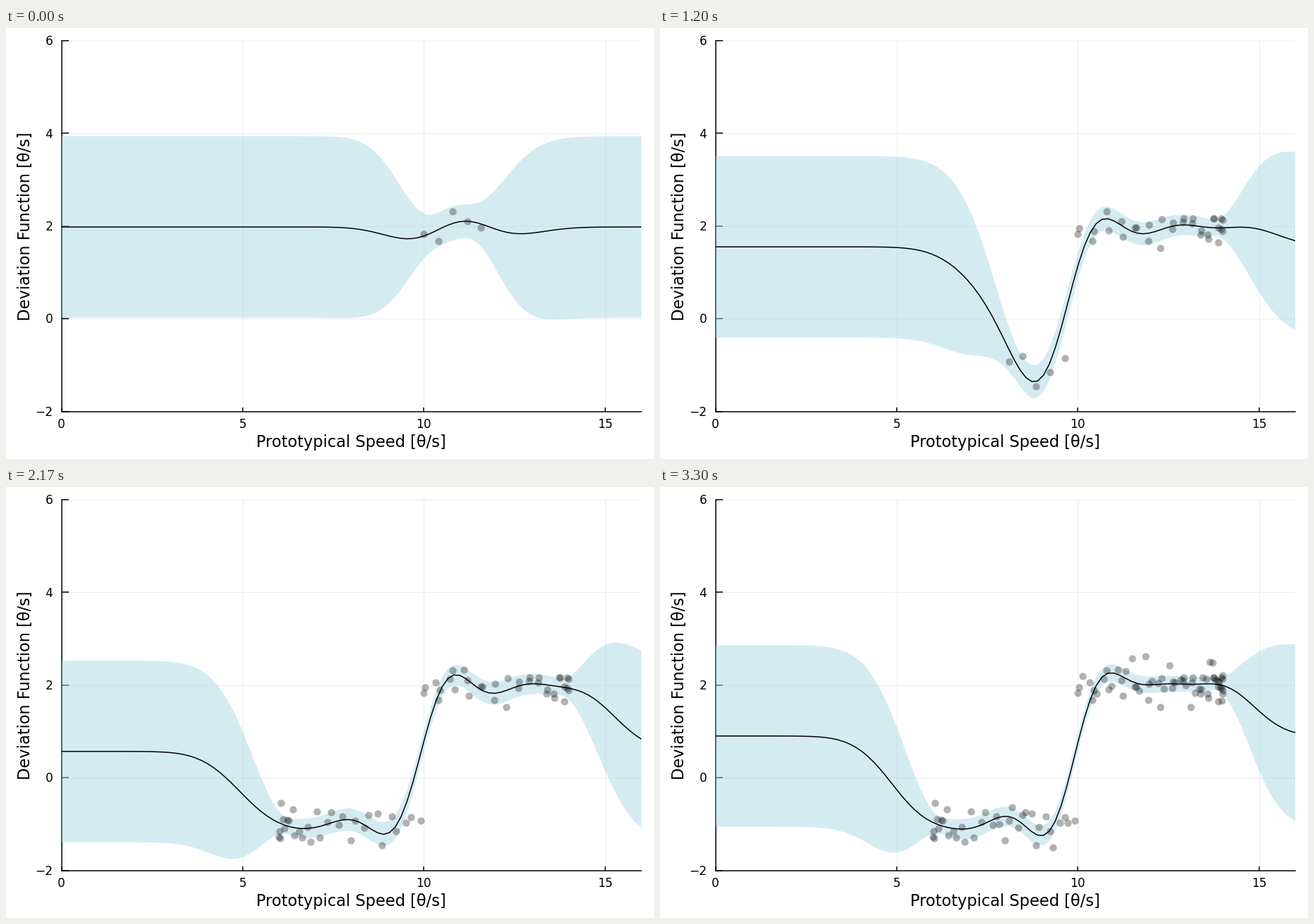
Write a matplotlib script that moves like this. It is 917 px wide and 611 px high and loops after 3330 ms.

```python
import numpy as np
import matplotlib.pyplot as plt
from matplotlib.animation import FuncAnimation
from matplotlib.patches import Polygon

W, H, DPI = 917, 611, 64
PX = 72 / DPI                               # points per pixel
LEFT, RIGHT, TOP, BOTTOM = 78.5, 899, 18, 543.5
N, START, LOOP = 100, 5, 3330
NOISE, Z = 0.3, 1.96

plt.rcParams["font.family"] = "DejaVu Sans"

# Noisy samples of a step function, visited along a sine sweep
speed = 10 + 4 * np.sin(np.linspace(0, 10, N))
dev = np.array([
    183, 168, 231, 211, 197, 167, 152, 194, 209, 205,
    181, 182, 217, 197, 194, 189, 213, 216, 165, 217,
    172, 191, 217, 217, 207, 215, 202, 197, 177, 191,
    189, 195, -85, -115, -146, -80, -93, -83, -75, -129,
    -138, -129, -124, -93, -109, -55, -115, -128, -131, -90,
    -91, -69, -115, -106, -73, -96, -102, -135, -108, -77,
    -84, -98, -93, 206, 213, 233, 257, 262, 204, 243,
    212, 152, 192, 213, 248, 209, 196, 181, 221, 166,
    207, 212, 250, 217, 183, 200, 206, 192, 209, 188,
    230, 198, 181, 220, -97, -150, -107, -74, -63, -101]) / 100
grid = np.linspace(0, 16, 100)


def kernel(a, b):
    return np.exp(-0.5 * (a[:, None] - b[None, :]) ** 2)


def posterior(n):
    """Gaussian process mean and 95 % half-width from the first n samples."""
    x, y = speed[:n], dev[:n]
    cov = kernel(x, x) + NOISE ** 2 * np.eye(n)
    cross = kernel(x, grid)
    weights = np.linalg.solve(cov, cross)
    mean = y.mean() + weights.T @ (y - y.mean())
    var = 1 - np.sum(cross * weights, axis=0)
    return mean, Z * np.sqrt(np.maximum(var, 0))


fig = plt.figure(figsize=(W / DPI, H / DPI), dpi=DPI, facecolor="white")
ax = fig.add_axes([LEFT / W, 1 - BOTTOM / H, (RIGHT - LEFT) / W, (BOTTOM - TOP) / H])
ax.set(xlim=(0, 16), ylim=(-2, 6), xticks=range(0, 16, 5), yticks=range(-2, 7, 2))
ax.set_axisbelow(True)
ax.grid(color="black", alpha=0.08, linewidth=1 * PX)
for axis, length in (("x", 6), ("y", 10)):
    ax.tick_params(axis=axis, direction="in", length=length * PX, width=1.5 * PX,
                   labelbottom=False, labelleft=False)
for side, spine in ax.spines.items():
    spine.set(visible=side in ("left", "bottom"), linewidth=1.5 * PX, zorder=0.6)


def label(x, y, text, size, **kw):
    fig.text(x / W, 1 - y / H, text, fontsize=size * PX, va="baseline", **kw)


for v in range(0, 16, 5):
    label(LEFT + v * (RIGHT - LEFT) / 16, 567, str(v), 17, ha="center")
for v in range(-2, 7, 2):
    y = BOTTOM - (v + 2) * (BOTTOM - TOP) / 8
    label(66.5, y + 6.3, str(v).replace("-", "\u2212"), 17, ha="right")
label(488.7, 594, "Prototypical Speed [θ/s]", 22.5, ha="center")
fig.text(34 / W, 1 - 281 / H, "Deviation Function [θ/s]", fontsize=22.5 * PX,
         rotation=90, rotation_mode="anchor", ha="center", va="baseline")

band = ax.add_patch(Polygon(np.zeros((3, 2)), facecolor="lightblue", alpha=0.5,
                            linewidth=0, zorder=1))
line, = ax.plot([], [], color="black", linewidth=1.5 * PX, zorder=2)
dots = ax.scatter([], [], s=(10.3 * PX) ** 2, color="black", alpha=0.3,
                  linewidths=0, zorder=3)


def draw(i):
    n = max(START, i + 1)
    mean, half = posterior(n)
    band.set_xy(np.column_stack([np.r_[grid, grid[::-1]],
                                 np.r_[mean + half, (mean - half)[::-1]]]))
    line.set_data(grid, mean)
    dots.set_offsets(np.column_stack([speed[:n], dev[:n]]))
    return band, line, dots


anim = FuncAnimation(fig, draw, frames=N, interval=LOOP / N, repeat=True,
                     repeat_delay=0, blit=False)
plt.show()
```
